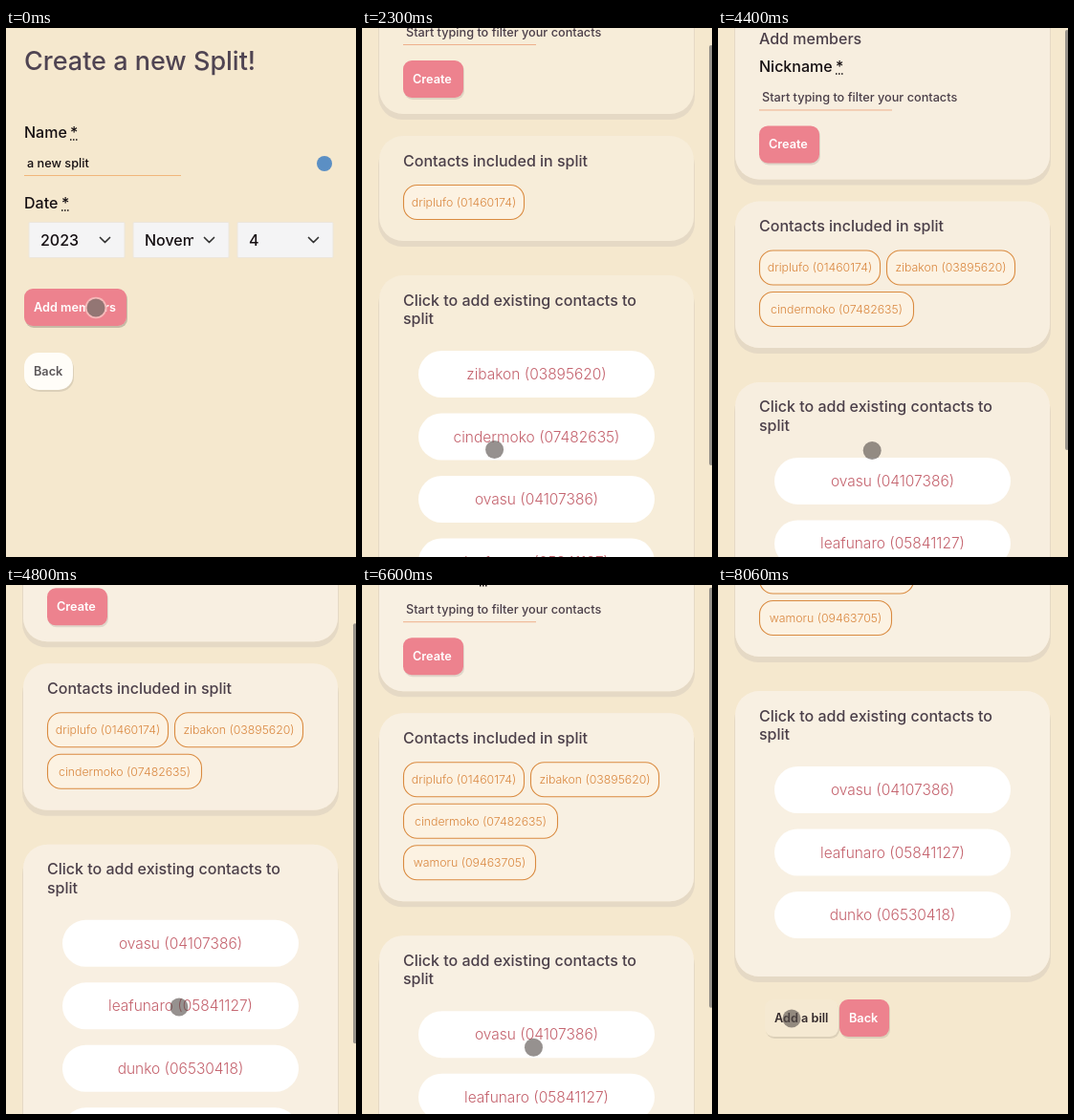
Recreate the animation shown at these times as an HTML page. Size 366x554 px, loop 8.22 s.

```html
<!DOCTYPE html>
<html lang="en">
<head>
<meta charset="utf-8">
<title>Create a new Split!</title>
<style>
html, body { margin: 0; width: 100%; height: 100%; overflow: hidden; background: #f5e8ce; }
svg { display: block; width: 366px; height: 554px; font-family: Inter, "Open Sans", sans-serif; }
</style>
</head>
<body>
<svg id="stage" viewBox="0 0 366 554"></svg>
<script>
const LOOP = 8220, PINK = '#ed828e', CREAM = '#f5e9d2', INK = '#4b3f49';
const stage = document.getElementById('stage');

function el(parent, tag, attrs, text) {
  const node = document.createElementNS('http://www.w3.org/2000/svg', tag);
  set(node, attrs);
  if (text) node.textContent = text;
  parent.appendChild(node);
  return node;
}
function set(node, attrs) {
  for (const k in attrs) node.setAttribute(k, attrs[k]);
}
const group = parent => el(parent, 'g', {});
const rect = (p, x, y, width, height, rx, fill, more) =>
  el(p, 'rect', { x, y, width, height, rx, fill, ...more });
const label = (p, x, y, size, weight, fill, text, more) =>
  el(p, 'text', { x, y, 'font-size': size, 'font-weight': weight, fill, ...more }, text);
const move = (node, y) => set(node, { transform: `translate(0 ${y})` });
const show = (node, on) => set(node, { opacity: +on });

function button(p, x, y, w, text, fill, color, r = 9) {
  const g = group(p);
  rect(g, x + 1, y + 2, w, 39, r, '#000', { opacity: 0.1 });
  rect(g, x, y, w, 39, r, fill);
  label(g, x + 10, y + 24, 12.7, 600, color, text);
  return g;
}
// A pink button stacked on its hovered look; returns the pink layer.
function hoverButton(p, x, y, w, text) {
  button(p, x, y, w, text, CREAM, '#33292b');
  return button(p, x, y, w, text, PINK, '#fff');
}
function field(p, x, y, text, starX) {
  label(p, x, y, 16, 500, '#150f12', text);
  label(p, starX, y, 16, 500, '#150f12', '*');
  el(p, 'path', { d: `M${starX} ${y + 2}h8`, stroke: '#150f12', 'stroke-width': 1.5, 'stroke-dasharray': '1.5 1.5' });
}
function select(p, x, text) {
  rect(p, x, 203.5, 100, 37, 1, '#f4f4f5', { stroke: '#ece6dc' });
  const box = el(p, 'svg', { x: x + 12, y: 204, width: 51, height: 36 });
  label(box, 0, 23.5, 16, 500, '#150f12', text);
  el(p, 'path', { d: `M${x + 74.5} 219.5l5 5l5 -5`, fill: 'none', stroke: '#333', 'stroke-width': 1.7,
    'stroke-linecap': 'round', 'stroke-linejoin': 'round' });
}

// Form page
const form = group(stage);
label(form, 19, 43.5, 27, 500, '#4f4452', 'Create a new Split!');
field(form, 19, 115, 'Name', 67);
label(form, 22, 146, 12.7, 500, '#150f12', 'a new split');
rect(form, 19, 154, 164, 1, 0, '#f1b67b');
el(form, 'circle', { cx: 333, cy: 142, r: 8, fill: '#5b8fc4' });
field(form, 19, 189, 'Date', 58);
select(form, 24, '2023');
select(form, 133, 'November');
select(form, 242, '4');
const addMembers = hoverButton(form, 19, 273, 107, 'Add members');
button(form, 19, 340, 51, 'Back', '#fffdf8', '#5a5658', 15);

// Members page
const members = group(stage);
function card(y, h) {
  const g = group(members);
  return [
    rect(g, 17, y + 6, 331, h, 25, '#e5d9c5'),
    rect(g, 18, y, 329, h, 25, CREAM),
    rect(g, 18, y, 329, h, 25, '#f9f1e5')
  ];
}
card(-80, 245);
const chosenCard = card(188, 110), listCard = card(334, 400);
const faces = [...members.children].map(g => g.lastChild);

label(members, 43, 23.5, 16, 500, INK, 'Add members');
field(members, 43, 52.5, 'Nickname', 123);
label(members, 46, 84, 12.7, 500, INK, 'Start typing to filter your contacts');
rect(members, 43, 92, 139, 1, 0, '#eeb08c');
button(members, 43, 109, 63, 'Create', PINK, '#fff');
label(members, 43, 219.5, 16, 500, INK, 'Contacts included in split');

// name, time added, chip x, chip row, chip width
const people = [
  ['driplufo (01460174)', 0, 43, 0, 127],
  ['zibakon (03895620)', 3050, 176, 0, 135],
  ['cindermoko (07482635)', 3900, 43, 1, 162],
  ['ovasu (04107386)'],
  ['leafunaro (05841127)'],
  ['dunko (06530418)'],
  ['wamoru (09463705)', 6150, 43, 2, 139]
].map(([name, added = Infinity, x, row, w]) => ({ name, added, x, row, w }));

for (const p of people) {
  if (p.added < Infinity) {
    p.chip = group(members);
    const y = 239.5 + p.row * 43.5;
    rect(p.chip, p.x + 0.5, y, p.w - 1, 36, 14, '#fcf2e2', { stroke: '#da8b40', 'stroke-width': 1.1 });
    label(p.chip, p.x + p.w / 2, y + 22.5, 12.3, 300, '#d9873f', p.name, { 'text-anchor': 'middle' });
  }
}
const list = group(members);
label(list, 43, 365.5, 16, 500, INK, 'Click to add existing contacts to');
label(list, 43, 385, 16, 500, INK, 'split');
for (const p of people) {
  if (!p.added) continue;
  p.item = group(list);
  rect(p.item, 59, 413, 247, 49, 24.5, '#fff');
  p.text = label(p.item, 182.5, 443, 15.5, 300, '#c4626d', p.name, { 'text-anchor': 'middle' });
}
const footer = group(members);
const addBill = hoverButton(footer, 49, 0, 77, 'Add a bill');
button(footer, 127, 0, 52, 'Back', PINK, '#fff');

const thumb = rect(stage, 363, 0, 4, 440, 2, '#98938b');
const pointer = group(stage);
const ring = el(pointer, 'circle', { r: 11.3, fill: '#f6b9b9' });
el(pointer, 'circle', { r: 9.5, fill: '#554d4a', opacity: 0.62 });

// Motion
const clamp = u => Math.min(1, Math.max(0, u));
const ramp = (t, a, b) => clamp((t - a) / (b - a));
const ease = u => u * u * (3 - 2 * u);
function track(keys, t, i = 1) {
  let k = 0;
  while (k < keys.length - 2 && t >= keys[k + 1][0]) k++;
  const a = keys[k], b = keys[k + 1];
  return a[i] + (b[i] - a[i]) * ease(ramp(t, a[0], b[0]));
}
const scrollKeys = [[1650, 0], [2300, 75], [2500, 75], [3000, 0], [4300, 0], [5125, 161],
  [6200, 161], [6650, 50], [6700, 50], [7441, 310]];
const pointerKeys = [[0, 94, 293], [900, 94, 293], [1300, 146, 284], [1650, 140, 440], [3000, 137, 443],
  [4000, 137, 443], [4750, 181, 442], [5250, 181, 442], [5800, 157, 521], [6250, 157, 521],
  [6850, 193, 462], [7350, 193, 462], [7850, 77, 454], [LOOP, 77, 454]];
const barSpans = [[1700, 3480], [4300, 5500], [6200, 7900]];
const presses = [0, 3000, 3850, 6100];

function draw(t) {
  const onForm = t < 1000;
  show(form, onForm);
  show(members, !onForm);
  show(addMembers, 1 - ramp(t, 120, 450));

  const scroll = track(scrollKeys, t);
  move(members, -scroll);
  let rows = 0, n = 0;
  for (const p of people) {
    const added = t >= p.added;
    if (p.chip) show(p.chip, added);
    if (added) rows = p.row;
    if (!p.item) continue;
    show(p.item, !added);
    move(p.item, n * 65.5);
    if (!added) n++;
    const hover = p.row === 2 ? t > 5700 : p.added === 3050 && t > 2950;
    set(p.text, { fill: hover ? '#120d10' : '#c4626d' });
  }
  const extra = rows * 43.5, bottom = 436.5 + 65.5 * n + extra;
  for (const r of chosenCard) set(r, { height: 110 + extra });
  for (const r of listCard) set(r, { height: bottom - 334 - extra });
  move(listCard[0].parentNode, extra);
  move(list, extra);
  move(footer, bottom + 24);
  for (const f of faces) show(f, 0.2 + 0.65 * ramp(t, 1300, 5000));
  show(addBill, 1 - ramp(t, 7700, 7950));

  const bar = Math.max(...barSpans.map(([a, b]) => Math.min(ramp(t, a, a + 100), 1 - ramp(t, b - 150, b))));
  set(thumb, { y: Math.max(2, 0.72 * scroll - 36), opacity: bar });

  set(pointer, { transform: `translate(${track(pointerKeys, t, 1)} ${track(pointerKeys, t, 2)})` });
  show(ring, presses.some(p => t >= p && t < p + 150));
}

let start;
function tick(now) {
  if (start === undefined) start = now;
  draw((now - start) % LOOP);
  requestAnimationFrame(tick);
}
draw(0);
requestAnimationFrame(tick);
</script>
</body>
</html>
```
